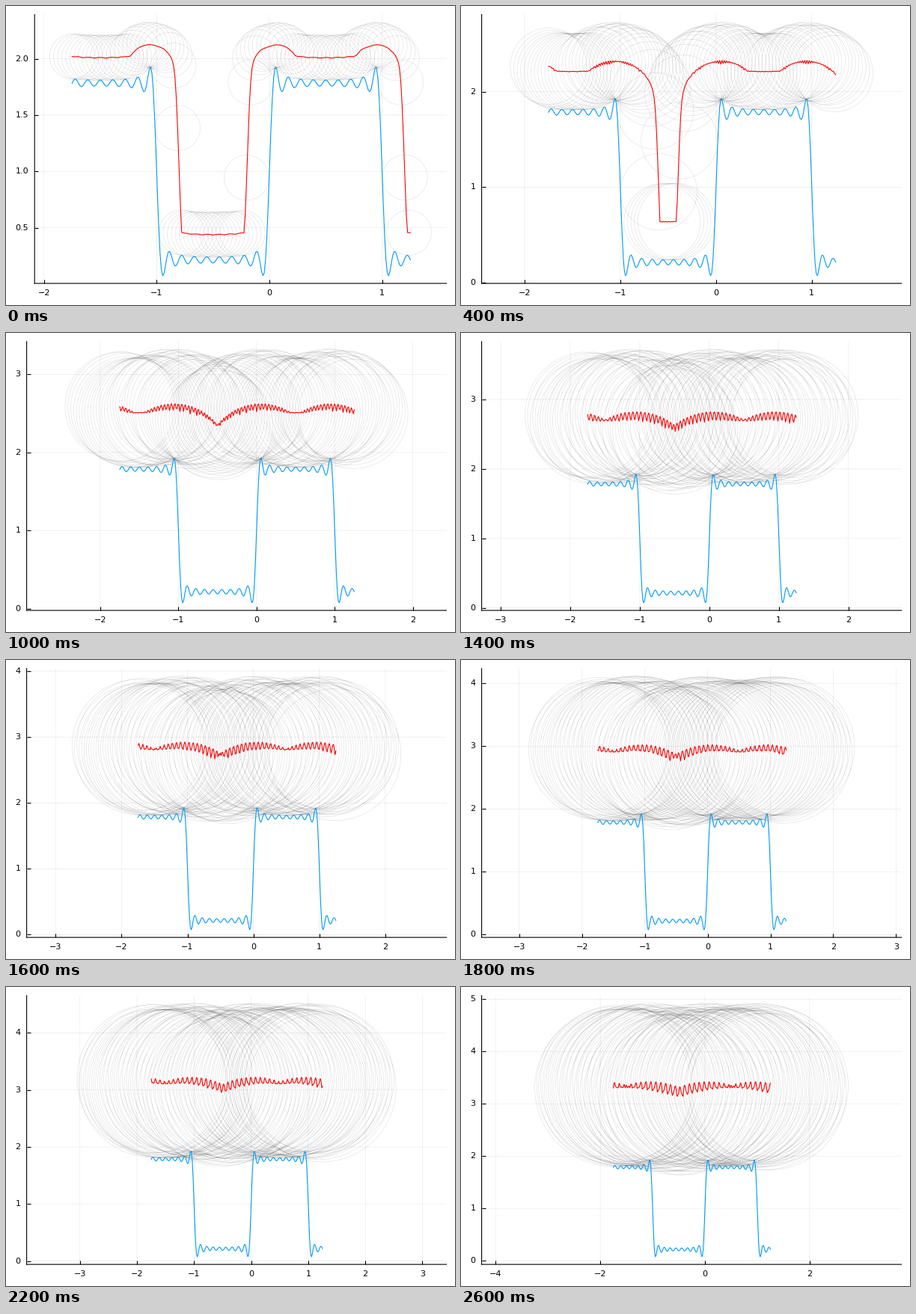
A matplotlib script for the animation above (2800 ms loop, 600 px wide and 400 px high).

```python
import matplotlib.pyplot as plt
import numpy as np
from matplotlib.animation import FuncAnimation
from matplotlib.collections import LineCollection

W, H, DPI = 600, 400, 100
FRAMES, INTERVAL = 14, 200
RIGHT, TOP, BOTTOM = 588.6, 11.4, 371.1
BLUE, RED = "#009AF9", "#FF0000"

plt.rcParams.update({
    "font.family": "DejaVu Sans",
    "font.size": 8,
    "path.snap": False,
    "ytick.alignment": "center",
})


def signal(x):
    """Square wave built from its first nine odd harmonics."""
    return 1 + sum(np.sin(n * np.pi * x) / n for n in range(1, 18, 2))


xs = -1.75 + 0.012 * np.arange(251)
ys = signal(xs)
angles = np.linspace(0, 2 * np.pi, 100)
ring = np.column_stack([np.cos(angles), np.sin(angles)])


def rolling_height(r):
    """Lowest centre height at which every rim point clears the signal."""
    rim = r * ring
    return (signal(xs[:, None] + rim[:, 0]) - rim[:, 1]).max(axis=1)


def ticks(lo, hi, step):
    return step * np.arange(np.ceil(lo / step), np.floor(hi / step) + 1)


def label(values, digits):
    return [f"{v + 0:.{digits}f}".replace("-", "\u2212") for v in values]


fig = plt.figure(figsize=(W / DPI, H / DPI), dpi=DPI, facecolor="white")
ax = fig.add_axes([0, 0, 1, 1])
ax.spines[["top", "right"]].set_visible(False)
ax.spines[["left", "bottom"]].set_linewidth(0.8)
ax.set_axisbelow(True)
ax.grid(True, color="black", alpha=0.1, linewidth=0.4)
ax.tick_params(direction="in", length=3.6, width=0.8)
ax.tick_params(axis="x", pad=5.6)
ax.tick_params(axis="y", pad=5.7)

balls = LineCollection([], colors=[(0, 0, 0, 0.15)], linewidths=0.36, zorder=2)
ax.add_collection(balls, autolim=False)
ax.plot(xs, ys, color=BLUE, linewidth=0.8, zorder=3)
path, = ax.plot([], [], color=RED, linewidth=0.8, zorder=4)


def update(i):
    r = 0.2 + 0.1 * i
    height = rolling_height(r)
    path.set_data(xs, height)

    centres = np.column_stack([xs, height])[::3]
    rims = centres[:, None, :] + r * ring
    balls.set_segments(list(rims))

    # Equal scales: the padded height sets the unit, the width follows.
    fine = i < 2
    left = 38.2 if fine else 27.6
    low, high = ys.min(), rims[..., 1].max()
    pad = 0.03 * (high - low)
    y0, y1 = low - pad, high + pad
    unit = (BOTTOM - TOP) / (y1 - y0)
    mid = (rims[..., 0].min() + rims[..., 0].max()) / 2
    half = (RIGHT - left) / unit / 2
    x0, x1 = mid - half, mid + half

    ax.set_position([left / W, 1 - BOTTOM / H,
                     (RIGHT - left) / W, (BOTTOM - TOP) / H])
    xt = ticks(x0, x1, 2 if i >= 12 else 1)
    yt = ticks(y0, y1, 0.5 if fine else 1)
    ax.set_xticks(xt, label(xt, 0))
    ax.set_yticks(yt, label(yt, 1 if fine else 0))
    ax.set_xlim(x0, x1)
    ax.set_ylim(y0, y1)
    return balls, path


anim = FuncAnimation(fig, update, frames=FRAMES, interval=INTERVAL,
                     init_func=lambda: (balls, path),
                     repeat=True, repeat_delay=0, blit=False)
plt.show()
```
